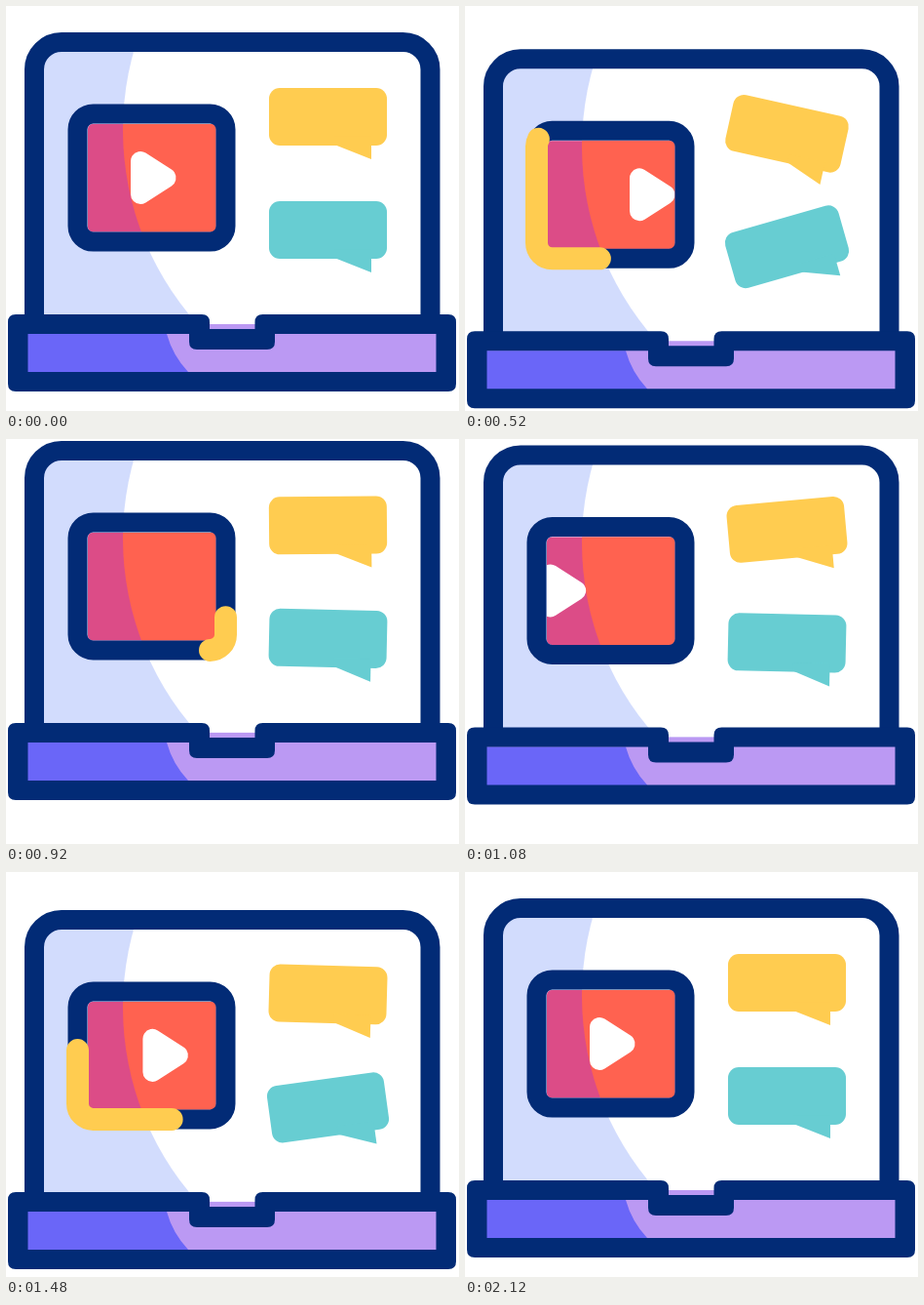
Animation of 465x415 px, one loop 2.24 s. Source, as an HTML page:

```html
<!DOCTYPE html>
<html lang="en">
<head>
<meta charset="utf-8">
<title>Laptop video chat</title>
<style>
  html, body { margin: 0; width: 100%; height: 100%; overflow: hidden; background: #fff; }
  svg { display: block; width: 465px; height: 415px; }
  .navy { fill: #022b76; }
  .line { fill: none; stroke: #022b76; stroke-width: 20; }
</style>
</head>
<body>
<svg viewBox="0 0 465 415">
  <defs>
    <clipPath id="lens"><circle cx="417" cy="127" r="297"/></clipPath>
    <clipPath id="screen"><rect x="84" y="121" width="131.5" height="110.5" rx="5"/></clipPath>
    <g id="bubble">
      <rect x="-60.5" y="-29.5" width="121" height="59" rx="11"/>
      <path d="M6.5 28.5 44.5 43.5V20H6.5Z"/>
    </g>
  </defs>
  <g id="laptop">
    <path fill="#d2dcfd" d="M29 326V65Q29 37 57 37H407Q435 37 435 65V326Z"/>
    <path fill="#fff" clip-path="url(#lens)" d="M29 326V65Q29 37 57 37H407Q435 37 435 65V326Z"/>
    <path class="line" d="M29 330V65A28 28 0 0 1 57 37H407.5A28 28 0 0 1 435.5 65V330"/>

    <rect fill="#bb99f3" x="12" y="326" width="440" height="59"/>
    <path fill="#6a66f8" d="M12 336H165Q171 358 187 375V385H12Z"/>
    <path class="navy" fill-rule="evenodd" d="M10 316H201Q209 316 209 324V331H255.5V324Q255.5 316 263.5 316H454Q462 316 462 324V387Q462 395 454 395H10Q2 395 2 387V324Q2 316 10 316Z
      M22.5 336V375H441.5V336H276V344Q276 352 268 352H196Q188 352 188 344V336Z"/>

    <g clip-path="url(#screen)">
      <rect fill="#dc4c87" x="80" y="115" width="140" height="120"/>
      <rect fill="#ff6250" x="80" y="115" width="140" height="120" clip-path="url(#lens)"/>
      <path id="play" fill="#fff" stroke="#fff" stroke-width="20" stroke-linejoin="round" d="M138 159V193L164.5 176Z"/>
    </g>
    <rect class="line" x="73.5" y="110.5" width="152" height="131" rx="16"/>
    <path id="bar" fill="none" stroke="#ffcc50" stroke-width="23" stroke-linecap="round" pathLength="1000"
      d="M209.5 241.5H89.5A16 16 0 0 1 73.5 225.5V126.5A16 16 0 0 1 89.5 110.5H209.5A16 16 0 0 1 225.5 126.5V225.5A16 16 0 0 1 209.5 241.5"/>

    <use id="top" href="#bubble" fill="#ffcc50"/>
    <use id="low" href="#bubble" fill="#67cdd2"/>
  </g>
</svg>
<script>
  const LOOP = 2240, TICK = 40, LAST = 2120;
  const $ = id => document.getElementById(id);
  const swing = u => (1 - Math.cos(Math.PI * u)) / 2;
  const rush = u => u * u;
  const settle = u => 1 - (1 - u) ** 2;

  // Each key: [time, value, easing into it]
  const bob = [[0, 0], [440, 20], [950, -25.5], [1500, 12], [1900, 0]];
  const tiltTop = [[0, 0], [330, 14.7], [1280, -7.5], [1640, 8], [2100, 0]];
  const tiltLow = [[0, 0], [360, -15.8], [520, -16], [980, 2], [1220, 0], [1680, -13], [2120, 0]];
  const slide = [[0, 0], [230, -10], [640, 92, rush], [919, 92], [920, -95], [1640, 18, settle], [2120, 0]];

  function at(keys, t) {
    const i = keys.findIndex(k => k[0] > t);
    if (i < 0) return keys[keys.length - 1][1];
    const [t0, v0] = keys[i - 1], [t1, v1, ease = swing] = keys[i];
    return v0 + (v1 - v0) * ease((t - t0) / (t1 - t0));
  }

  const trim = (t, start) => 1000 * swing(Math.min(1, Math.max(0, (t - start) / 688)));

  function drawBar(t) {
    const start = t < 1120 ? 190 : 1193;
    const head = trim(t, start), tail = trim(t, start + 167);
    const bar = $("bar");
    bar.style.visibility = head - tail > 0.5 ? "visible" : "hidden";
    bar.setAttribute("stroke-dasharray", `${head - tail} 2000`);
    bar.setAttribute("stroke-dashoffset", -tail);
  }

  const move = (id, value) => $(id).setAttribute("transform", value);

  function draw(now) {
    const t = Math.min(LAST, Math.floor(now % LOOP / TICK) * TICK);
    move("laptop", `translate(0 ${at(bob, t)})`);
    move("play", `translate(${at(slide, t)} 0)`);
    move("top", `translate(330.5 113.5) rotate(${at(tiltTop, t)})`);
    move("low", `translate(330.5 229.5) rotate(${at(tiltLow, t)})`);
    drawBar(t);
  }

  const begin = performance.now();
  function loop() {
    draw(performance.now() - begin);
    requestAnimationFrame(loop);
  }
  loop();
</script>
</body>
</html>
```
